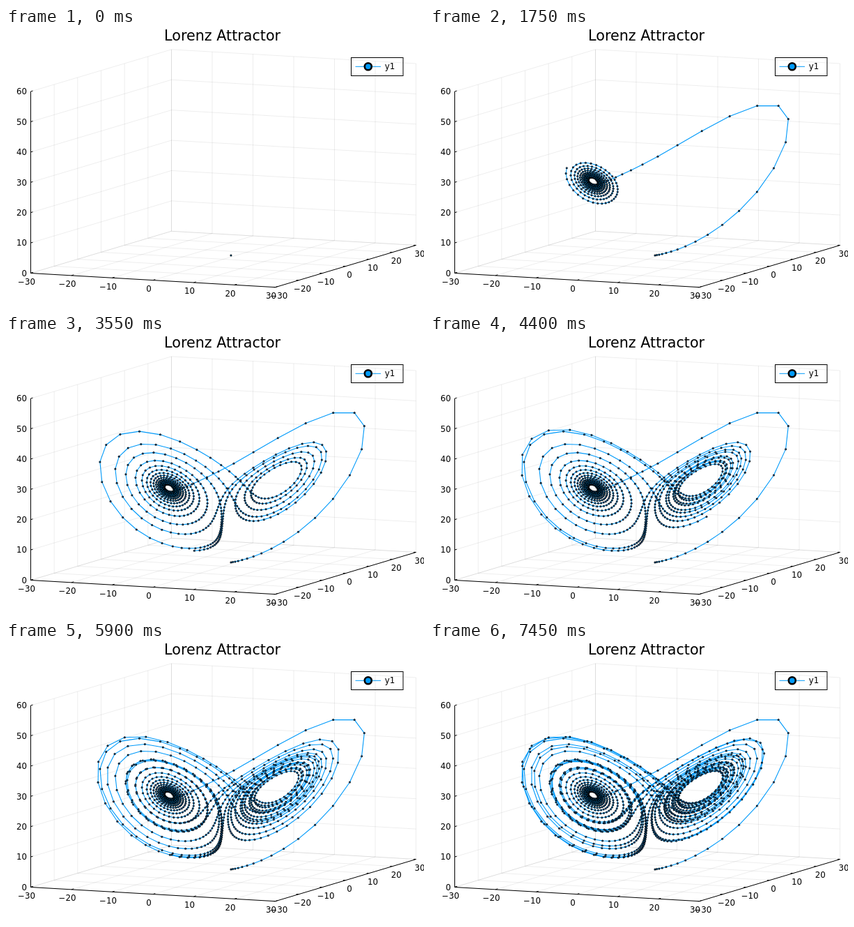
An HTML page with a canvas for the animation above (7500 ms loop, 600 px wide and 400 px high).

```html
<!DOCTYPE html>
<html lang="en">
<head>
<meta charset="utf-8">
<title>Lorenz Attractor</title>
<style>
  html, body { margin: 0; width: 600px; height: 400px; overflow: hidden; background: #fff; }
  svg, canvas { position: absolute; left: 0; top: 0; display: block; }
  text { font: 11.8px "DejaVu Sans", sans-serif; text-anchor: middle; }
  .title { font-size: 20.7px; }
  .end { text-anchor: end; }
  .start { text-anchor: start; }
  .grid { stroke: #000; stroke-opacity: .07; }
  .axis { stroke: #000; }
</style>
</head>
<body>
<svg id="plot" width="600" height="400" viewBox="0 0 600 400">
  <text class="title" x="310.6" y="18.4">Lorenz Attractor</text>
  <rect x="495.5" y="42.5" width="74.5" height="26" fill="#fff" stroke="#000"/>
  <line x1="501.5" y1="55.3" x2="538" y2="55.3" stroke="#009afa"/>
  <circle cx="519.8" cy="55.3" r="5" fill="#009afa" stroke="#000" stroke-width="2.6"/>
  <text class="start" x="543.8" y="59.4">y1</text>
</svg>
<canvas id="trace" width="600" height="400"></canvas>
<script>
const BLUE = '#009afa';
const STEP_MS = 50, STEPS = 150, POINTS_PER_STEP = 10;
const svg = document.getElementById('plot');
const ctx = document.getElementById('trace').getContext('2d');

// Orthographic view of x, y in [-30, 30] and z in [0, 60]
function project(x, y, z) {
  const u = (x + 30) / 60, v = (y + 30) / 60, w = z / 60;
  return [35.5 + 351 * u + 202 * v, 351.5 + 20.2 * u - 60.2 * v - 260.5 * w];
}

function add(tag, attrs) {
  const el = document.createElementNS('http://www.w3.org/2000/svg', tag);
  for (const name in attrs) el.setAttribute(name, attrs[name]);
  return svg.appendChild(el);
}

function line(cls, [x1, y1], [x2, y2]) {
  add('line', { class: cls, x1, y1, x2, y2 });
}

function label(value, x, y, cls = '') {
  add('text', { class: cls, x, y }).textContent = String(value).replace('-', '\u2212');
}

function tick([x, y], dx, dy) {
  line('axis', [x, y], [x + dx, y + dy]);
}

function drawAxes() {
  const P = project;
  for (let i = 0; i <= 6; i++) {
    const a = i * 10 - 30, z = i * 10;
    line('grid', P(a, -30, 0), P(a, 30, 0));
    line('grid', P(a, 30, 0), P(a, 30, 60));
    line('grid', P(-30, a, 0), P(30, a, 0));
    line('grid', P(-30, a, 0), P(-30, a, 60));
    line('grid', P(-30, -30, z), P(-30, 30, z));
    line('grid', P(-30, 30, z), P(30, 30, z));
  }
  line('axis', P(-30, -30, 0), P(30, -30, 0));
  line('axis', P(30, -30, 0), P(30, 30, 0));
  line('axis', P(-30, -30, 0), P(-30, -30, 60));
  for (let i = 0; i <= 6; i++) {
    const a = i * 10 - 30, z = i * 10;
    tick(P(a, -30, 0), 3.2, -1);
    tick(P(30, a, 0), -3.4, -0.2);
    tick(P(-30, -30, z), 3, -0.9);
    label(a, 29.5 + 58.5 * i, 367.7 + 3.4 * i);
    label(a, 391.8 + 33.7 * i, 388.2 - 10 * i);
    label(z, 30, 355.8 - 43.4 * i, 'end');
  }
}

// Euler steps; each coordinate uses the ones already updated
function attractor(count) {
  const dt = 0.02, sigma = 10, rho = 28, beta = 8 / 3;
  const points = [];
  let x = 1, y = 1, z = 1;
  for (let i = 0; i < count; i++) {
    x += dt * (sigma * (y - x));
    y += dt * (x * (rho - z) - y);
    z += dt * (x * y - beta * z);
    points.push(project(x, y, z));
  }
  return points;
}

function dot(x, y, r, color) {
  ctx.fillStyle = color;
  ctx.beginPath();
  ctx.arc(x, y, r, 0, 2 * Math.PI);
  ctx.fill();
}

const points = attractor(STEPS * POINTS_PER_STEP);

function drawTrace(step) {
  const shown = points.slice(0, 1 + step * POINTS_PER_STEP);
  ctx.clearRect(0, 0, 600, 400);
  ctx.strokeStyle = BLUE;
  ctx.lineWidth = 1.1;
  ctx.lineJoin = 'round';
  ctx.beginPath();
  for (const [x, y] of shown) ctx.lineTo(x, y);
  ctx.stroke();
  for (const [x, y] of shown) {
    dot(x, y, 1.5, '#000');
    dot(x, y, 0.6, BLUE);
  }
}

drawAxes();
const start = performance.now();
let last = -1;

function frame() {
  const step = Math.floor((performance.now() - start) / STEP_MS) % STEPS;
  if (step !== last) drawTrace(last = step);
  requestAnimationFrame(frame);
}
frame();
</script>
</body>
</html>
```
